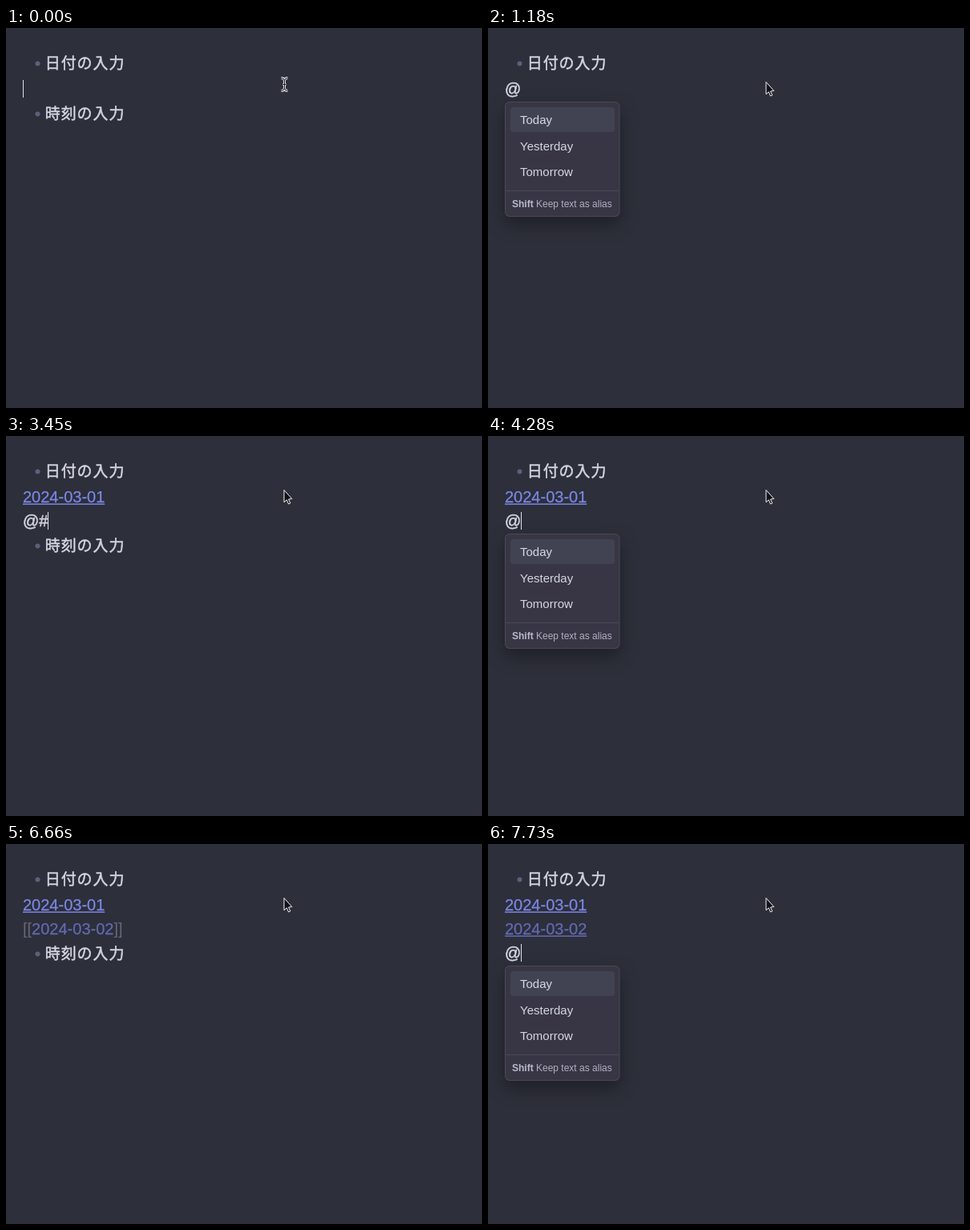
Write an HTML page with a canvas that moves like this. It is 594 by 475 pixels and loops after 8000 ms.

```html
<!DOCTYPE html>
<html lang="ja">
<head>
<meta charset="utf-8">
<style>
  html, body { margin: 0; width: 100%; height: 100%; overflow: hidden; background: #2d2f3a; }
  canvas { display: block; }
</style>
</head>
<body>
<canvas id="stage" width="594" height="475"></canvas>
<script>
const ctx = document.getElementById("stage").getContext("2d");
const LOOP = 8000, LEFT = 21, ROW = 30;
const SANS = '"Liberation Sans", Arial, sans-serif';
const CJK = '"Noto Sans CJK JP", "Noto Sans CJK", sans-serif';
const TEXT = "#d5d6e3", BRACKET = "#67677a";
const LINKS = [["2024-03-01", "#7c87e6"], ["2024-03-02", "#636ab4"]];

// [start ms, active line, content, caret visible, menu open]
const STEPS = [
  [0, 0, "", 1, 0], [110, 0, "", 0, 0],
  [590, 0, "@", 1, 0], [700, 0, "@", 1, 1], [1180, 0, "@", 0, 1],
  [1650, 0, "link", 1, 0], [2130, 0, "link", 0, 0],
  [2610, 1, "", 1, 0], [3210, 1, "", 0, 0],
  [3450, 1, "@#", 1, 0], [3930, 1, "@#", 0, 0],
  [4160, 1, "@", 1, 0], [4280, 1, "@", 1, 1], [4760, 1, "@", 0, 1], [5230, 1, "@", 1, 1],
  [5710, 1, "link", 0, 0], [6190, 1, "link", 1, 0], [6660, 1, "link", 0, 0],
  [6900, 2, "", 1, 0], [7380, 2, "", 0, 0],
  [7620, 2, "@", 1, 0], [7730, 2, "@", 1, 1]
];
const ARROW_AT = 230;

const arrow = new Path2D("M347 67.5V82.8L350.3 79.8L352.6 85L354.8 84L352.6 79L356.8 78.5Z");
const beam = new Path2D("M343.5 62.5Q347.5 62.5 347.5 66V75Q347.5 78.5 343.5 78.5" +
  "M351.5 62.5Q347.5 62.5 347.5 66M347.5 75Q347.5 78.5 351.5 78.5M345.5 70.5H349.5");

// Fills text and thickens it slightly with a thin stroke.
function ink(str, x, y, color, font, bolder) {
  ctx.font = font;
  ctx.fillStyle = ctx.strokeStyle = color;
  ctx.lineWidth = bolder;
  ctx.fillText(str, x, y);
  if (bolder) ctx.strokeText(str, x, y);
}

// Draws a run of text and returns the x where it ends.
function write(str, x, y, color, size = 20, weight = "", bolder = 0) {
  ink(str, x, y, color, `${weight} ${size}px ${SANS}`, bolder);
  return x + ctx.measureText(str).width;
}

function box(x, y, w, h, r, fill) {
  ctx.beginPath();
  ctx.roundRect(x, y, w, h, r);
  ctx.fillStyle = fill;
  ctx.fill();
}

function outline(path, color, width) {
  ctx.strokeStyle = color;
  ctx.lineWidth = width;
  ctx.stroke(path);
}

function heading(str, y) {
  box(36.5, y - 2.5, 6, 6, 3, "#5f5e7e");
  ctx.letterSpacing = "0.9px";
  ink(str, 48.8, y + 7.2, TEXT, `19px ${CJK}`, 0.5);
  ctx.letterSpacing = "0px";
}

function menu(y) {
  ctx.save();
  ctx.shadowColor = "rgba(0,0,0,.35)";
  ctx.shadowBlur = 22;
  ctx.shadowOffsetY = 9;
  box(LEFT, y, 143.5, 144, 6, "#4a4959");
  ctx.restore();
  box(LEFT + 1, y + 1, 141.5, 142, 5, "#383644");
  box(28, y + 7, 130, 31, 4, "#424352");
  ["Today", "Yesterday", "Tomorrow"].forEach((item, i) =>
    write(item, 40, y + 28 + Math.round(i * 32.5), TEXT, 15));
  box(LEFT + 1, y + 111, 141.5, 1, 0, "#4a4959");
  const x = write("Shift", 30, y + 132, "#b9b9cd", 12, "bold");
  write(" Keep text as alias", x, y + 132, "#b0b0c2", 12);
}

function draw(t) {
  const [, line, content, caret, open] = STEPS.findLast(step => step[0] <= t);
  const top = 65 + line * ROW, base = top + 18;

  ctx.fillStyle = "#2d2f3a";
  ctx.fillRect(0, 0, 594, 475);
  heading("日付の入力", 44);
  heading("時刻の入力", 107 + line * ROW);

  LINKS.slice(0, line).forEach(([date, color], i) => {
    const y = 83 + i * ROW, end = write(date, LEFT, y, color, 20, "", 0.25);
    ctx.fillRect(LEFT, y + 1.4, end - LEFT, 1.5);
  });

  let x = LEFT;
  if (content === "link") {
    const [date, color] = LINKS[line];
    x = write("[[", x, base, BRACKET);
    x = write(date, x, base, color, 20, "", 0.25);
    x = write("]]", x, base, BRACKET);
  } else {
    x = write(content, x, base, TEXT, 20, "", 0.5);
  }
  if (open) menu(top + 27);
  if (caret) box(Math.floor(x), top, 1, 22, 0, "#dfe0ec");

  if (t < ARROW_AT) {
    outline(beam, "#e8e8ec", 3);
    outline(beam, "#15151a", 1);
  } else {
    ctx.fillStyle = "#111116";
    ctx.fill(arrow);
    outline(arrow, "#f4f4f6", 1);
  }
}

const start = performance.now();
function tick() {
  draw((performance.now() - start) % LOOP);
  requestAnimationFrame(tick);
}
tick();
</script>
</body>
</html>
```
